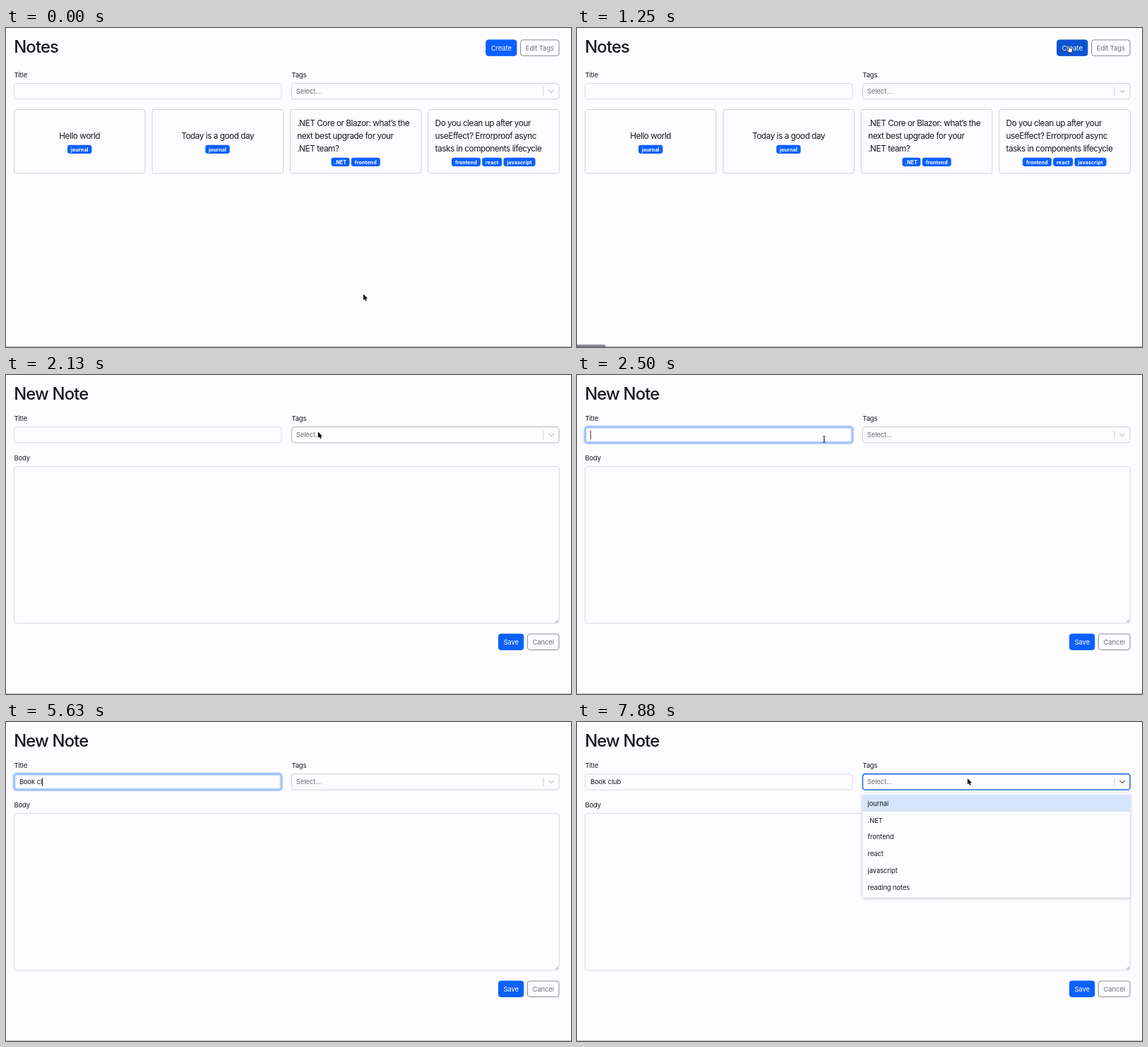
An HTML page that plays this animation: 800x452 px, repeating every 8 s.

```html
<!DOCTYPE html>
<html lang="en">
<head>
<meta charset="utf-8">
<title>Notes</title>
<style>
  html, body { margin: 0; width: 100%; height: 100%; overflow: hidden; background: #fdfcfe; }
  svg { display: block; width: 100vw; height: 100vh; }
  text { font: 9.45px Inter, "Liberation Sans", sans-serif; letter-spacing: -.012em; fill: #16191d; white-space: pre; }
  .head { font-size: 23.8px; font-weight: 500; letter-spacing: -.035em; }
  .card { font-size: 11.8px; letter-spacing: -.04em; }
  .badge { font-size: 7.2px; font-weight: 700; letter-spacing: .01em; fill: #fff; }
  .mid { text-anchor: middle; }
  .light { fill: #fff; }
  .gray { fill: #6c7278; }
  .hint { fill: #6d6d70; }
</style>
</head>
<body>
<svg id="stage" viewBox="0 0 800 452"></svg>
<script>
const BLUE = '#0a60fd', LINE = '#d8dbe0', CARD = '#cfcfd3';
const stage = document.getElementById('stage');

const text = (x, y, s, cls = '') => `<text x="${x}" y="${y}" class="${cls}">${s}</text>`;
const box = (x, y, w, h, more = '') =>
  `<rect x="${x}" y="${y}" width="${w}" height="${h}" rx="3.4" fill="none" stroke="${LINE}" ${more}/>`;
const fill = c => `style="fill:${c};stroke:none"`;

const badge = (cx, y, w, s) =>
  box(cx - w / 2, y, w, 12.2, fill(BLUE)) + text(cx, y + 8.7, s, 'badge mid');

const button = (x, y, w, s, solid, id = '') =>
  box(x, y, w, 22.4, `id="${id}" style="fill:${solid ? BLUE : 'none'};stroke:${solid ? BLUE : '#858b91'}"`) +
  text(x + w / 2, y + 14.6, s, `mid ${solid ? 'light' : 'gray'}`);

const select = (y, id) => box(404.5, y, 378.5, 22.4, `id="${id}" style="stroke:#cfcfd2"`) +
  text(410.8, y + 14.7, 'Select...', 'hint') +
  `<path d="M760.8 ${y + 5}v12.5" stroke="#cfcfd2"/>` +
  `<path id="${id}Arrow" d="M768.8 ${y + 9.6}l3.2 3.2l3.2-3.2" fill="none" stroke="#c4c4c7" stroke-width="1.3" stroke-linecap="round"/>`;

const fields = (y, id) => text(11.4, y - 8.5, 'Title') + text(404.4, y - 8.5, 'Tags') + select(y, id);

// One card: lines of title, then its tags as [centre, width, label]
const card = (x, lines, tags, id = '') => {
  const one = lines.length === 1;
  return `<g id="${id}">` + box(x, 115.5, 185.5, 90.5, `style="fill:#fdfcfe;stroke:${CARD}"`) +
    lines.map((s, i) => one ? text(x + 92.7, 156.8, s, 'card mid') : text(x + 9.8, 138.7 + 18 * i, s, 'card')).join('') +
    tags.map(([cx, w, s]) => badge(cx, one ? 165.8 : 183.8, w, s)).join('') + '</g>';
};

const tagNames = ['journal', '.NET', 'frontend', 'react', 'javascript', 'reading notes'];

stage.innerHTML = `
<g id="list">
  ${text(11.2, 35, 'Notes', 'head')}
  ${button(679.7, 16.9, 43.2, 'Create', true, 'create')}
  ${button(728.5, 16.9, 54.6, 'Edit Tags', false)}
  ${fields(78.5, 'filter')}
  ${box(11.5, 78.5, 378.5, 22.4)}
  ${card(11.5, ['Hello world'], [[104.2, 34.4, 'journal']])}
  ${card(207, ['Today is a good day'], [[299.5, 34.4, 'journal']])}
  ${card(402.4, ['.NET Core or Blazor: what’s the', 'next best upgrade for your', '.NET team?'],
    [[473.5, 26, '.NET'], [509.3, 41, 'frontend']])}
  ${card(597.8, ['Do you clean up after your', 'useEffect? Errorproof async', 'tasks in components lifecycle'],
    [[651.4, 41, 'frontend'], [688.2, 28, 'react'], [727, 45, 'javascript']], 'lastCard')}
</g>
<g id="form">
  ${text(11.2, 35, 'New Note', 'head')}
  ${fields(73.6, 'tags')}
  ${box(11.5, 73.6, 378.5, 22.4, 'id="ring" style="stroke:#c3d8fd;stroke-width:4.6"')}
  ${box(11.5, 73.6, 378.5, 22.4, 'id="title"')}
  <text id="typed" x="18.9" y="88.3"></text>
  <rect id="caret" y="79" width="1" height="12" fill="#222"/>
  ${text(11.4, 121.2, 'Body')}
  ${box(11.5, 129.6, 771.8, 222.4)}
  <path d="M777.5 351l4.5-4.5M780 351l2-2" stroke="#77777a" stroke-width=".8"/>
  ${button(697.4, 367, 35.4, 'Save', true)}
  ${button(738.4, 367, 44.6, 'Cancel', false)}
  <g id="menu">
    <rect x="404.3" y="101" width="379" height="147.8" rx="2.5" fill="#fdfcfe" style="filter:drop-shadow(0 1.2px 2px #0004)"/>
    <rect x="404.3" y="103.3" width="379" height="23.8" fill="#d5e5fb"/>
    ${tagNames.map((s, i) => text(411.6, 118.7 + 23.88 * i, s)).join('')}
  </g>
</g>
<path d="M0 451.5H800" stroke="#bdbdc0"/>
<path id="status" d="M0 448.6H38q2.4 0 2.4 2.4v1H0z" fill="#211e2b"/>
<g id="arrow" stroke-linejoin="round">
  <path d="M0 0v8.6l2-1.8l1.3 3l1.5-.7l-1.3-2.8h2.6z" fill="#000" stroke="#fff" stroke-width="1.2" paint-order="stroke"/>
</g>
<path id="hand" d="M-1.2 5.5V.8q.9-1.3 1.8 0v2.8q2.6-.2 4 1.2v2.4l-1 2.6h-4.2l-2.8-3.6q.6-1.5 2.2.2z" fill="#fff" stroke="#111" stroke-width=".8"/>
<path id="beam" d="M-1.8-4.4q1.8 0 1.8 1.2V3.2q0 1.2-1.8 1.2M1.8-4.4Q0-4.4 0-3.2M0 3.2q0 1.2 1.8 1.2M-1 .9h2" fill="none" stroke="#222" stroke-width="1"/>`;

const el = {};
stage.querySelectorAll('[id]').forEach(e => { if (e.id) el[e.id] = e; });

const show = (e, on) => { e.style.display = on ? '' : 'none'; };
const ramp = (t, a, b) => Math.min(1, Math.max(0, (t - a) / (b - a)));
const mix = (a, b, k) => a.map((v, i) => Math.round(v + (b[i] - v) * k));
const rgb = c => `rgb(${c})`;
const within = ([x, y], l, t, r, b) => x > l && x < r && y > t && y < b;

// Pointer legs: start, end, from, bend, to
const legs = [
  [250, 1080, [506, 377], [640, 190], [697, 25]],
  [1630, 2380, [697, 25], [530, 75], [350, 91]],
  [6560, 7150, [350, 91], [450, 40], [553, 80]],
];
function pointer(t) {
  const [a, b, p, q, r] = legs.filter(l => t >= l[0]).pop() || legs[0];
  const s = ramp(t, a, b), k = s * s * (3 - 2 * s), j = 1 - k;
  return p.map((v, i) => j * j * v + 2 * j * k * q[i] + k * k * r[i]);
}

const keys = [3750, 4000, 4130, 4250, 4750, 5500, 5630, 6130, 6380];
const caretOff = [[2880, 3380], [5000, 5500]];

function draw(t) {
  const page = t >= 1380, open = t >= 7380;
  const at = pointer(t);
  show(el.list, !page);
  show(el.form, page);
  show(el.menu, open);

  const overCard = !page && within(at, 597, 112, 783, 206);
  const overCreate = !page && within(at, 679, 16, 723, 40);
  const overTitle = page && within(at, 11, 73, 390, 97);
  const hover = ramp(t, 1000, 1150);
  el.create.style.fill = el.create.style.stroke = rgb(mix([10, 96, 253], [11, 83, 208], hover));
  el.lastCard.style.transform = overCard ? 'translateY(-3px)' : '';
  el.lastCard.style.filter = overCard ? 'drop-shadow(0 1.8px 2.4px #0003)' : '';
  el.filter.style.stroke = within(at, 404, 78, 783, 101) ? '#b3b3b6' : '#cfcfd2';

  const focus = ramp(t, 2380, 2500) * (1 - ramp(t, 7330, 7480));
  el.ring.style.opacity = focus;
  el.title.style.stroke = rgb(mix([216, 219, 224], [126, 170, 246], focus));
  el.tags.style.stroke = open ? '#1f6ff0' : within(at, 404, 73, 783, 97) ? '#b3b3b6' : '#cfcfd2';
  el.tags.style.strokeWidth = open ? 1.6 : 1;
  el.tagsArrow.style.stroke = open ? '#66666a' : '';

  el.typed.textContent = 'Book club'.slice(0, keys.filter(k => t >= k).length);
  el.caret.setAttribute('x', 18.7 + (page ? el.typed.getComputedTextLength() : 0));
  show(el.caret, t >= 2440 && t < 6880 && !caretOff.some(([a, b]) => t >= a && t < b));

  el.status.style.opacity = t < 1250 ? 0 : t < 1380 ? .5 : 1 - ramp(t, 1850, 2000);

  const typing = t >= 3750 && t < 6600;
  const shape = typing ? '' : overTitle ? 'beam' : overCard || overCreate ? 'hand' : 'arrow';
  for (const id of ['arrow', 'hand', 'beam']) {
    show(el[id], id === shape);
    el[id].setAttribute('transform', `translate(${at})`);
  }
}

function tick(now) {
  draw(now % 8000);
  requestAnimationFrame(tick);
}
draw(0);
requestAnimationFrame(tick);
</script>
</body>
</html>
```
